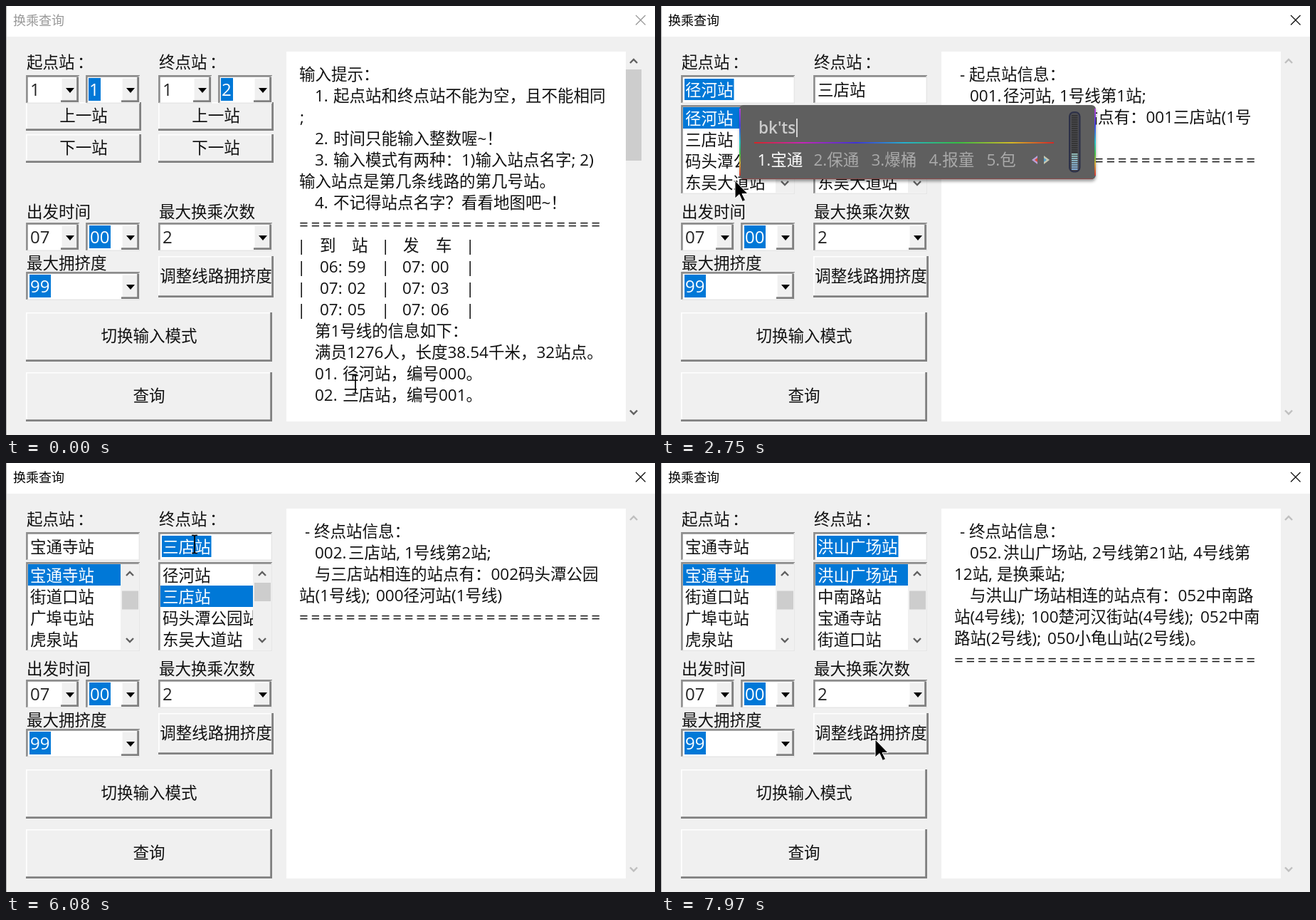
Animation, 912 px wide and 602 px high, one loop 8 s. Source, as an HTML page:

```html
<!DOCTYPE html>
<html lang="zh-CN">
<head>
<meta charset="utf-8">
<title>换乘查询</title>
<style>
html, body { margin: 0; width: 100%; height: 100%; overflow: hidden; background: #f0f0f0; }
svg { display: block; width: 912px; height: 602px; }
text { font-family: "Open Sans", "Noto Sans CJK SC", "Noto Sans CJK", sans-serif; font-size: 22.5px; white-space: pre; }
.ime { font-weight: 600; }
</style>
</head>
<body>
<svg id="stage" viewBox="0 0 912 602">
  <defs>
    <linearGradient id="rainbow">
      <stop offset="0" stop-color="#e02020"/><stop offset=".16" stop-color="#d020c0"/>
      <stop offset=".34" stop-color="#3a30e0"/><stop offset=".5" stop-color="#20b8d8"/>
      <stop offset=".68" stop-color="#30c840"/><stop offset=".86" stop-color="#e0c020"/>
      <stop offset="1" stop-color="#e02020"/>
    </linearGradient>
    <linearGradient id="edge" x1="0" y1="0" x2="0" y2="1">
      <stop offset="0" stop-color="#c040e0"/><stop offset=".25" stop-color="#4040f0"/>
      <stop offset=".5" stop-color="#20c8d0"/><stop offset=".68" stop-color="#40c840"/>
      <stop offset=".82" stop-color="#e0b030"/><stop offset="1" stop-color="#d83030"/>
    </linearGradient>
    <linearGradient id="meter" gradientUnits="userSpaceOnUse" x1="0" y1="170" x2="0" y2="230">
      <stop offset="0" stop-color="#c8c850"/><stop offset=".4" stop-color="#98c8a0"/><stop offset="1" stop-color="#88b8e8"/>
    </linearGradient>
    <filter id="soft" x="-10%" y="-20%" width="120%" height="150%"><feGaussianBlur stdDeviation="2"/></filter>
    <clipPath id="clipL"><rect x="31" y="142" width="130" height="120"/></clipPath>
    <clipPath id="clipR"><rect x="217" y="142" width="130" height="120"/></clipPath>
  </defs>
  <g id="base"></g><g id="live"></g>
</svg>
<script>
const LOOP = 8000, BLUE = '#0078d7', EM = 22.5;
const SCROLL_OFF = 840, SWITCH = 900, PICK_A = 1430, COMMIT_A = 3300, CHOOSE_A = 4300,
      PICK_B = 5100, COMMIT_B = 7250, CHOOSE_B = 7400;
const $ = id => document.getElementById(id);
const pen = document.createElement('canvas').getContext('2d');

// Drawing helpers; text is placed by the middle of its line.
const rect = (x, y, w, h, fill, more = '') =>
  `<rect x="${x}" y="${y}" width="${w}" height="${h}" fill="${fill}" ${more}/>`;
const line = (d, color, w = 1.5) =>
  `<path d="${d}" fill="none" stroke="${color}" stroke-width="${w}"/>`;
const text = (x, mid, s, fill = '#111', more = '') =>
  `<text x="${x}" y="${mid + 8.5}" fill="${fill}" ${more}>${s}</text>`;

function sunken(x, y, w, h) {
  return rect(x, y, w, h, '#fff') +
    line(`M${x + 1.4} ${y + h - 1}V${y + 1.4}H${x + w}`, '#8c8c8c', 2.6) +
    line(`M${x + 1} ${y + h - .7}H${x + w - .7}V${y + 1}`, '#e6e6e6', 1.4);
}
function raised(x, y, w, h) {
  return rect(x, y, w, h, '#f0f0f0') +
    line(`M${x + .8} ${y + h}V${y + .8}H${x + w}`, '#fff', 1.6) +
    line(`M${x} ${y + h - 1.4}H${x + w - 1.4}V${y}`, '#808080', 2.8);
}
function button(x, y, w, h, s, mid = y + h / 2) {
  return raised(x, y, w, h) + text(x + w / 2, mid, s, '#111', 'text-anchor="middle"');
}
function combo(x, y, w, s, mark = 0, pad = 6) {
  const bx = x + w - 26;
  return sunken(x, y, w, 40) + raised(bx, y + 3, 25, 35) +
    `<path d="M${bx + 7} ${y + 18}h12l-6 7z" fill="#000"/>` +
    (mark ? rect(x + pad - 1, y + 4, mark, 32, BLUE) : '') +
    text(x + pad, y + 20.5, s, mark ? '#fff' : '#222', 'style="font-size:24px"');
}
const chevron = (x, y, dir, color) =>
  line(`M${x - 5} ${y + 3 * dir}l5 ${-5 * dir}l5 ${5 * dir}`, color, 2.4);

function edit(x, s, mark, caret) {
  const w = s.length * EM;
  return sunken(x, 97, 160, 40) +
    (mark ? rect(x + 5, 102, w + 2, 30, BLUE) : '') +
    text(x + 6, 117.5, s, mark ? '#fff' : '#111') +
    (caret ? rect(x + 7 + w, 102, 1.6, 30, '#000') : '');
}
function list(x, items, chosen, thumb, clip) {
  const rows = items.map((s, i) =>
    (i === chosen ? rect(x + 3, 142 + 30 * i, 130, 30, BLUE) : '') +
    text(x + 6, 157.5 + 30 * i, s, i === chosen ? '#fff' : '#111')).join('');
  return sunken(x, 139, 160, 125) + `<g clip-path="url(#${clip})">${rows}</g>` +
    rect(x + 133, 142, 26, 120, '#f0f0f0') + rect(x + 135, thumb, 23, 26, '#cdcdcd') +
    chevron(x + 146, 155, 1, '#606060') + chevron(x + 146, 249, -1, '#606060');
}

// Each row alternates x and text.
const RULE = [412, '='.repeat(26)];
const TIPS = [
  [412, '输入提示：'],
  [434, '1.', 460, '起点站和终点站不能为空，且不能相同'],
  [413, ';'],
  [434, '2.', 460, '时间只能输入整数喔~！'],
  [434, '3.', 460, '输入模式有两种：1)输入站点名字; 2)'],
  [412, '输入站点是第几条线路的第几号站。'],
  [434, '4.', 460, '不记得站点名字？看看地图吧~！'],
  RULE];
const bars = [409, '|', 527, '|', 646, '|'];
const times = (a, b, c, d) => [...bars, 441, a + ':', 480, b, 557, c + ':', 597, d];
const TABLE = [
  [...bars, 441, '到', 486, '站', 558, '发', 604, '车'],
  times('06', '59', '07', '00'), times('07', '02', '07', '03'), times('07', '05', '07', '06'),
  [434, '第1号线的信息如下：'],
  [434, '满员1276人，长度38.54千米，32站点。'],
  [434, '01.', 473, '径河站，编号000。'],
  [434, '02.', 473, '三店站，编号001。']];
const INFO_JH = [
  [420, '-', 433, '起点站信息：'],
  [434, '001.', 481, '径河站,', 560, '1号线第1站;'],
  [434, '与径河站相连的站点有：001三店站(1号'],
  [412, '线)。'], RULE];
const INFO_BT = [
  [420, '-', 433, '起点站信息：'],
  [434, '054.', 481, '宝通寺站,', 583, '2号线第23站;'],
  [434, '与宝通寺站相连的站点有：054街道口站'],
  [412, '(2号线);', 498, '052中南路站(2号线)。'], RULE];
const INFO_SD = [
  [420, '-', 433, '终点站信息：'],
  [434, '002.', 481, '三店站,', 560, '1号线第2站;'],
  [434, '与三店站相连的站点有：002码头潭公园'],
  [412, '站(1号线);', 520, '000径河站(1号线)'], RULE];
const INFO_HS = [
  [420, '-', 433, '终点站信息：'],
  [434, '052.', 481, '洪山广场站,', 606, '2号线第21站,', 748, '4号线第'],
  [412, '12站,', 472, '是换乘站;'],
  [434, '与洪山广场站相连的站点有：052中南路'],
  [412, '站(4号线);', 520, '100楚河汉街站(4号线);', 758, '052中南'],
  [412, '路站(2号线);', 543, '050小龟山站(2号线)。'], RULE];

function report(rows) {
  return rows.map((row, i) => {
    let out = '';
    for (let k = 0; k < row.length; k += 2)
      out += text(row[k], 95 + 30 * i, row[k + 1], '#111',
        row === RULE ? 'style="letter-spacing:3.55px"' : '');
    return out;
  }).join('');
}

const HEAD = ['径河站', '三店站', '码头潭公园站', '东吴大道站'];
const NEAR_BT = ['宝通寺站', '街道口站', '广埠屯站', '虎泉站'];
const NEAR_HS = ['洪山广场站', '中南路站', '宝通寺站', '街道口站'];

// Steps: [start, value...]; the last one reached is in force.
const step = (t, steps) => steps.filter(s => t >= s[0]).pop();

const REPORTS = [[0, TIPS.concat(TABLE)], [SWITCH, TIPS], [PICK_A, INFO_JH],
  [COMMIT_A, INFO_BT], [PICK_B, INFO_SD], [COMMIT_B, INFO_HS]];
// start, left, right, keys, candidates, spacing, meter level
const IME = [[0],
  [2430, 110, 522, 'b', '不 把 被 本 吧', 60, 20],
  [2590, 110, 611, "bk't", '报团 保托 包团 宝塔 表', 81, 22],
  [2680, 110, 611, "bk'ts", '宝通 保通 爆桶 报童 包', 81, 25],
  [2950, 110, 611, "bk'ts'si", '宝通寺 宝通 保通 报童', 92, 34],
  [COMMIT_A],
  [6620, 297, 784, 'hs', '红色 黄色 灰色 黑色 会', 79, 46],
  [6850, 297, 816, "hs'u", '红树 护士 合适 核实 回收', 80, 52],
  [7000, 297, 816, "hs'uj", '洪山 红山 红杉 鸿山 虹山', 80, 57],
  [COMMIT_B]];

function ime([, l, r, keys, words, gap, level]) {
  if (!l) return '';
  pen.font = '600 22.5px "Open Sans", "Noto Sans", sans-serif';
  const caret = l + 28 + pen.measureText(keys).width, m = r - 37, a = r - 90;
  let out = rect(l + 1, 142, r - l - 1, 104, '#000', 'rx="6" opacity=".4" filter="url(#soft)"') +
    rect(l, 139, r - l, 104, '#5f5f5f', 'rx="6"') +
    rect(l, 144, 1.8, 94, 'url(#edge)') + rect(r - 1.8, 144, 1.8, 94, 'url(#edge)') +
    line(`M${l + 4} 242.5H${r - 4}`, '#8a4848', 1) +
    text(l + 27, 170, keys, '#ccc', 'class="ime"') + rect(caret, 158, 1.6, 26, '#eee') +
    rect(l + 21, 191, r - l - 80, 1.8, 'url(#rainbow)');
  words.split(' ').forEach((w, i) => {
    out += text(l + 25.5 + gap * i - (i ? 2 : 0), 215, `${i + 1}.${w}`, i ? '#aaa' : '#fff');
  });
  out += `<path d="M${a} 216l8-6v12z" fill="#b8a0d8"/><path d="M${a + 4} 216l4-3v6z" fill="#d84838"/>` +
    `<path d="M${a + 25} 216l-8-6v12z" fill="#c8c8b0"/><path d="M${a + 21} 216l-4-3v6z" fill="#50a0d0"/>` +
    rect(m, 149, 14.5, 83.5, '#4b4b50', 'rx="6" stroke="#2c3048" stroke-width="2"');
  for (let y = 153; y < 229; y += 3)
    out += rect(m + 3, y, 8.5, 1.8, y > 229 - level ? 'url(#meter)' : '#333');
  return out;
}

const PATH = [[0, 491, 531], [100, 491, 531], [600, 240, 470], [950, 240, 470], [1380, 90, 112],
  [1750, 90, 115], [2060, 100, 228], [2300, 100, 228], [2500, 104, 245], [3420, 104, 245],
  [3680, 164, 193], [3900, 164, 193], [4200, 110, 157], [4450, 110, 157], [4950, 262, 106],
  [5250, 262, 106], [5550, 266, 217], [5680, 266, 217], [5940, 265, 114], [6080, 265, 114],
  [6500, 274, 160], [7430, 274, 160], [7600, 301, 370], [7900, 301, 388], [LOOP, 301, 388]];

function pointer(t) {
  const i = PATH.findIndex(p => p[0] > t);
  const [t0, x0, y0] = PATH[i - 1], [t1, x1, y1] = PATH[i];
  let k = (t - t0) / (t1 - t0);
  k = k * k * (3 - 2 * k);
  const x = x0 + (x1 - x0) * k, y = y0 + (y1 - y0) * k;
  const within = (a, b) => x > a && x < b;
  const beam = (within(394, 871) && y > 64) ||
    (t >= SWITCH && y > 97 && y < 137 && (within(28, 188) || within(214, 374)));
  const pressed = [810, PICK_A, CHOOSE_A, PICK_B, CHOOSE_B].some(c => t >= c && t < c + 170);
  const shape = beam
    ? line('M-4 -12.5H-1L0 -11L1 -12.5H4M0 -11V11M-4 12.5H-1L0 11L1 12.5H4', '#000', 1.7)
    : '<path d="M0 0V25L6 19.5L10.5 29.5L14.5 27.5L10 18.5H18Z" fill="#000" stroke="#fff" stroke-width="1"/>';
  return (pressed ? `<circle cx="${x}" cy="${y}" r="18" fill="#ecd810" opacity=".62"/>` : '') +
    `<g transform="translate(${x.toFixed(1)} ${y.toFixed(1)})">${shape}</g>`;
}

function stationInputs(t) {
  if (t < SWITCH)
    return [28, 214].map((x, i) =>
      button(x, 135, 162, 40, '上一站', 153.5) + button(x, 180, 162, 40, '下一站', 198) +
      combo(x, 97, 75, '1') + combo(x + 84, 97, 76, i + 1, 17, 5)).join('');
  const blink = from => Math.floor((t - from) / 530) % 2 === 0;
  const [, a, markA, typingA] = step(t, [[0, '径河站'], [PICK_A, '径河站', true],
    [COMMIT_A, '宝通寺', false, true], [CHOOSE_A, '宝通寺站', true], [PICK_B, '宝通寺站']]);
  const [, b, markB, typingB] = step(t, [[0, '三店站'], [PICK_B, '三店站', true],
    [COMMIT_B, '洪山', false, true], [CHOOSE_B, '洪山广场站', true]]);
  const movedA = t >= COMMIT_A, movedB = t >= COMMIT_B;
  return edit(28, a, markA, typingA && blink(COMMIT_A)) +
    list(28, movedA ? NEAR_BT : HEAD, typingA ? -1 : 0, movedA ? 179.5 : 168, 'clipL') +
    edit(214, b, markB, typingB && blink(COMMIT_B)) +
    list(214, movedB ? NEAR_HS : HEAD, typingB ? -1 : movedB ? 0 : 1, movedB ? 179.5 : 168, 'clipR');
}

function frame(t) {
  const active = t >= 70, scroll = t < SCROLL_OFF, arrow = scroll ? '#606060' : '#bfbfbf';
  return text(10, 18.5, '换乘查询', active ? '#000' : '#999', 'style="font-size:18px"') +
    line('M885 13L898.5 26.5M898.5 13L885 26.5', active ? '#111' : '#999', 1.3) +
    (scroll ? rect(871, 89, 22, 128, '#cdcdcd') : '') +
    chevron(882, 77, 1, arrow) + chevron(882, 570.5, -1, arrow) +
    stationInputs(t) + report(step(t, REPORTS)[1]) + ime(step(t, IME)) + pointer(t);
}

const stationLabel = (x, s) => text(x, 78, s) + text(x + 71, 78, '：');

$('base').innerHTML = rect(0, 0, 912, 602, '#f0f0f0') + rect(0, 0, 912, 43, '#fff') +
  rect(0, 0, 1, 602, '#b4b4b4') + rect(394, 64, 477, 519, '#fff') +
  stationLabel(29, '起点站') + stationLabel(215, '终点站') +
  text(29, 288, '出发时间') + text(215, 288, '最大换乘次数') + text(29, 360, '最大拥挤度') +
  combo(28, 304, 75, '07') + combo(112, 304, 76, '00', 30) +
  combo(214, 304, 160, '2') + combo(28, 373, 160, '99', 30) +
  button(214, 351, 162, 58, '调整线路拥挤度', 378) +
  button(28, 430, 346, 69, '切换输入模式', 462) + button(28, 514, 346, 69, '查询', 546);

const begin = performance.now();
let shown = '';
function tick() {
  const next = frame((performance.now() - begin) % LOOP);
  if (next !== shown) $('live').innerHTML = shown = next;
  requestAnimationFrame(tick);
}
tick();
</script>
</body>
</html>
```
